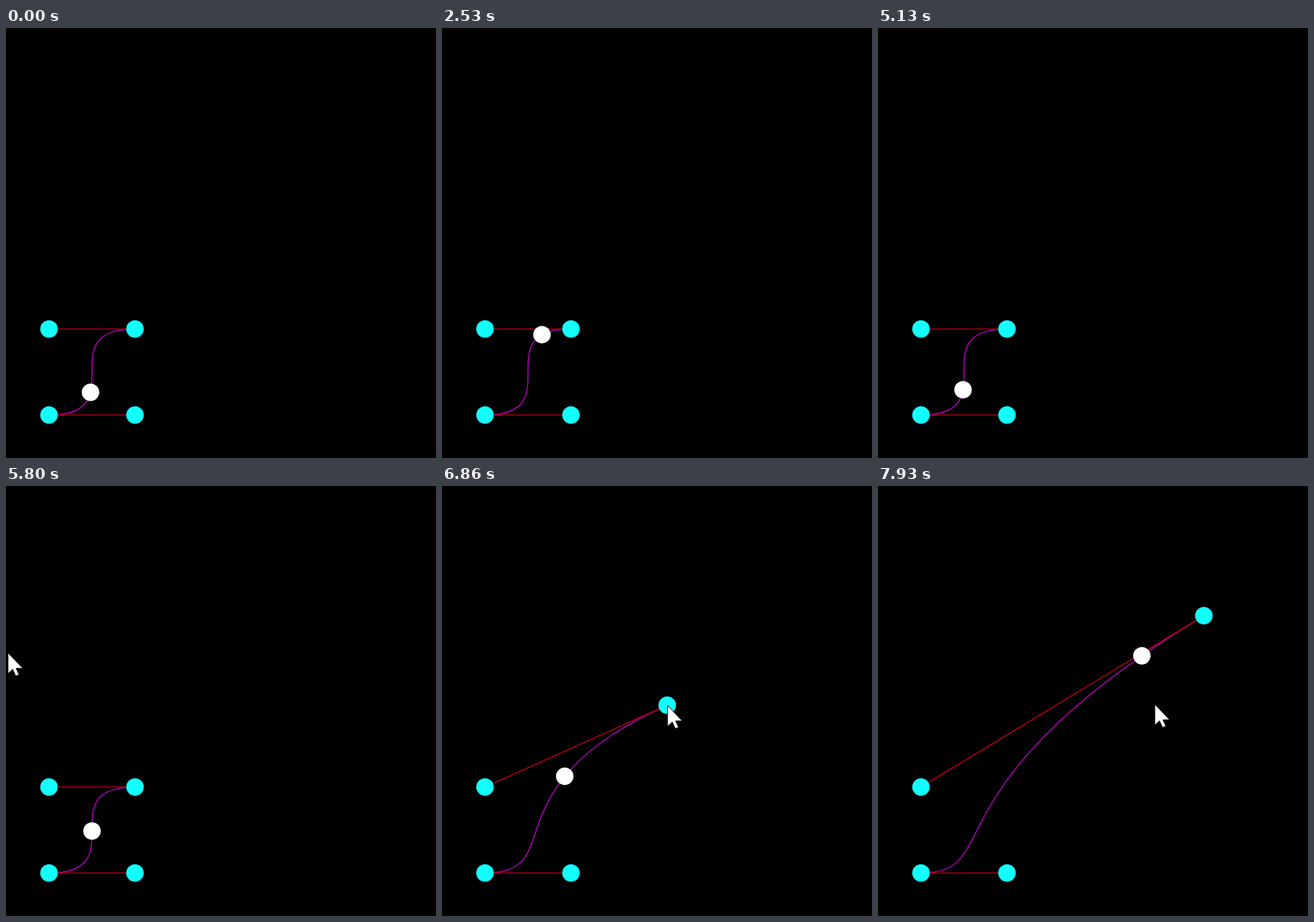
An HTML page for the animation above (8000 ms loop, 640 by 640 pixels).

```html
<!DOCTYPE html>
<html lang="en">
<head>
<meta charset="utf-8">
<title>Bezier handles</title>
<style>
  html, body { margin: 0; width: 100%; height: 100%; overflow: hidden; background: #000; }
  svg { display: block; width: 100%; height: 100%; }
</style>
</head>
<body>
<svg viewBox="0 0 640 640">
  <path id="curve" fill="none" stroke="#b000b8" stroke-width="1.6"/>
  <g stroke="#b0000e" stroke-width="1.6">
    <line x1="64" y1="576" x2="192" y2="576"/>
    <line id="arm" x1="64" y1="448"/>
  </g>
  <circle id="ball" r="13" fill="#fff"/>
  <g fill="#12ffff">
    <circle cx="64" cy="576" r="13"/>
    <circle cx="192" cy="576" r="13"/>
    <circle cx="64" cy="448" r="13"/>
    <circle id="end" r="13"/>
  </g>
  <path id="cursor" d="M0 0V31L7 24.5L11.5 34.5L16.5 32.5L12 23H22Z" fill="#fff" stroke="#000"/>
</svg>
<script>
const LOOP = 8000, STEP = 1000 / 15, LAP = 5000;
const LAP_START = 3340, PRESS = 6430;
const el = id => document.getElementById(id);
const curve = el('curve'), arm = el('arm'), ball = el('ball'), end = el('end'), cursor = el('cursor');

// Where the pointer enters, grabs the handle, drops it and leaves to.
const enter = [-24, 220], grab = [196, 451], drop = [485.5, 193.5], leave = [412, 325];

const mix = (a, b, u) => a + (b - a) * u;

function ease(ms, from, to) {
  const u = Math.min(1, Math.max(0, (ms - from) / (to - from)));
  return u * u * (3 - 2 * u);
}

function pointerAt(ms) {
  const arrive = ease(ms, 5660, 6300), drag = ease(ms, 6451, 7302), exit = ease(ms, 7600, 7933);
  return [0, 1].map(i =>
    mix(mix(mix(enter[i], grab[i], arrive), drop[i], drag), leave[i], exit));
}

// The held handle follows the pointer and stays where it is dropped.
function handleAt(ms) {
  if (ms < PRESS) return [192, 448];
  return pointerAt(Math.min(ms, 7500)).map(v => v - 0.5);
}

function bezier(a, b, c, d, u) {
  const v = 1 - u;
  return a * v * v * v + 3 * b * v * v * u + 3 * c * v * u * u + d * u * u * u;
}

function setAll(node, attrs) {
  for (const name in attrs) node.setAttribute(name, attrs[name]);
}

function draw(time) {
  // The picture advances 15 times a second; the first step is held twice.
  const step = Math.min(119, Math.floor((time % LOOP + 7) / STEP));
  const ms = step < 2 ? 0 : step * STEP;

  const u = ms < LAP_START - 20 ? 0.337 + ms / LAP : Math.max(0, (ms - LAP_START) / LAP);
  const [x, y] = handleAt(ms);

  setAll(curve, { d: `M64 576C192 576 64 448 ${x} ${y}` });
  setAll(arm, { x2: x, y2: y });
  setAll(end, { cx: x, cy: y });
  setAll(ball, { cx: bezier(64, 192, 64, x, u), cy: bezier(576, 576, 448, y, u) });
  setAll(cursor, { transform: `translate(${pointerAt(ms)})` });
}

const start = performance.now();
function tick() {
  draw(performance.now() - start);
  requestAnimationFrame(tick);
}
tick();
</script>
</body>
</html>
```
